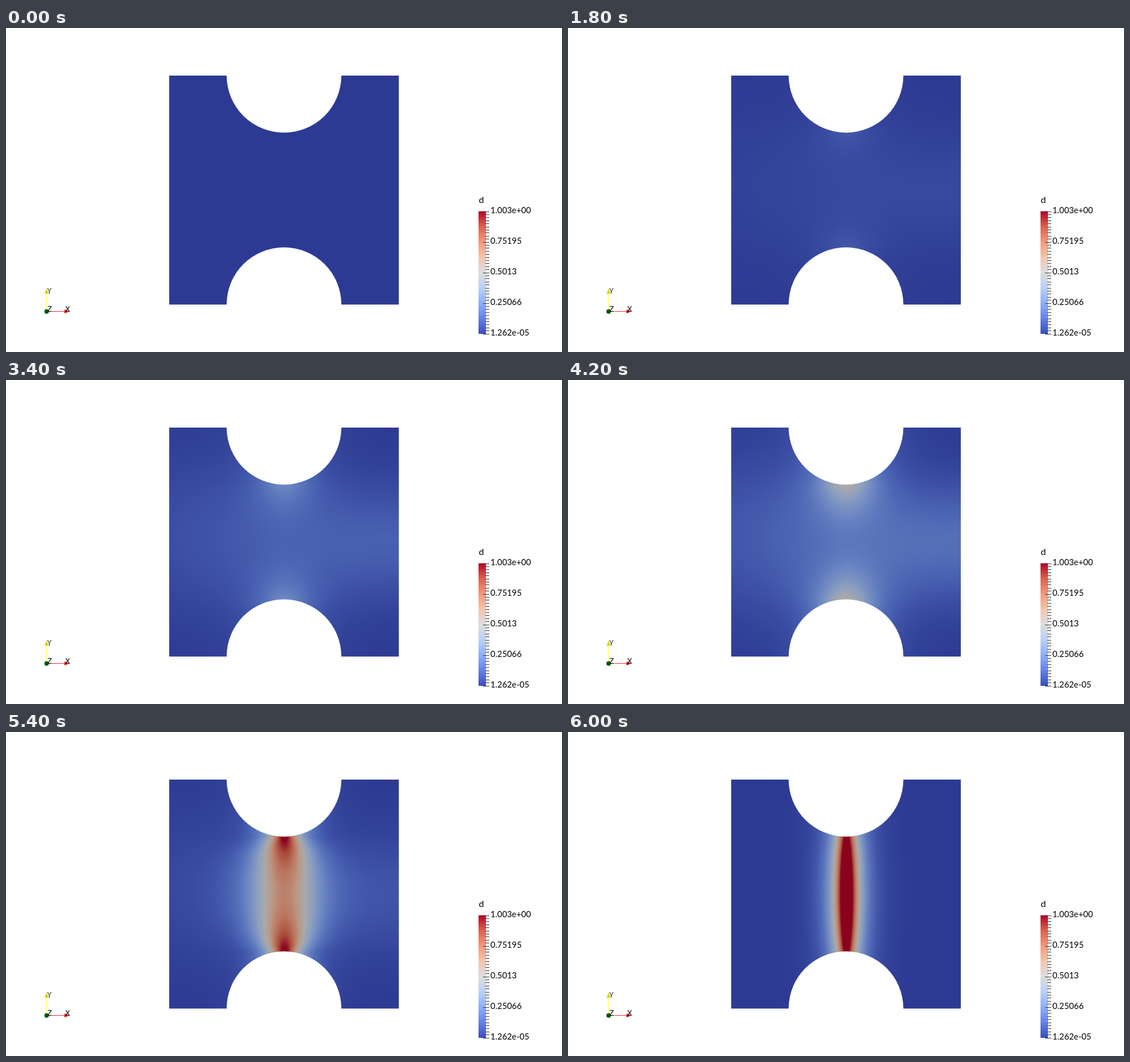
Recreate the animation shown at these times as an HTML page with a canvas. Size 979 by 572 pixels, loop 6.2 s.

```html
<!DOCTYPE html>
<html>
<head>
<meta charset="utf-8">
<style>
html, body { margin: 0; width: 100%; height: 100%; overflow: hidden; background: #fff; }
canvas { display: block; }
</style>
</head>
<body>
<canvas id="stage" width="979" height="572"></canvas>
<script>
const ctx = document.getElementById('stage').getContext('2d');
const LEFT = 287, TOP = 84, SIZE = 405, CX = 490, CY = 286, R = 101;
const SHADE = 0.765;

// Diverging cool-to-warm map, evenly spaced stops
const STOPS = [
  [59, 76, 192], [97, 130, 234], [140, 175, 254], [184, 208, 249], [221, 221, 221],
  [244, 196, 173], [244, 152, 122], [222, 96, 77], [180, 4, 38]
];
const mix = (a, b, u) => a + (b - a) * u;
function warmth(d) {
  const p = Math.max(0, Math.min(1, d)) * 8, i = Math.min(7, Math.floor(p));
  return STOPS[i].map((c, n) => mix(c, STOPS[i + 1][n], p - i));
}
const LUT = Array.from({ length: 1025 }, (_, i) => warmth(i / 1024).map(c => c * SHADE));

// step, background, then peak, core and decay of the band at the notch and at mid-height
const KEYS = [
  [0, 0, 0, 30, 30, 0, 60, 30],
  [7, .042, .07, 30, 30, 0, 60, 30],
  [15, .115, .22, 30, 30, .01, 60, 30],
  [19, .165, .46, 30, 30, .035, 60, 30],
  [23, .15, .82, 15, 28, .27, 60, 28],
  [26, .035, 1.15, 4, 19, .84, 60, 22],
  [28, 0, 1.1, 4, 18, 1.5, 4, 18]
];
function stateAt(step) {
  let i = 0;
  while (i < KEYS.length - 2 && step >= KEYS[i + 1][0]) i++;
  const a = KEYS[i], b = KEYS[i + 1];
  const u = Math.pow((step - a[0]) / (b[0] - a[0]), i ? 1.15 : 1.6);
  return a.map((v, n) => mix(v, b[n], u));
}

const field = document.createElement('canvas');
field.width = field.height = SIZE;
const fctx = field.getContext('2d');
const image = fctx.createImageData(SIZE, SIZE);

function paintField(step) {
  const [, back, peakN, coreN, decayN, peakM, coreM, decayM] = stateAt(step);
  const px = image.data;
  let o = 0;
  for (let j = 0; j < SIZE; j++) {
    const dy = j + TOP - CY, q = dy / R, g = Math.max(0, 1 - q * q);
    const peak = mix(peakN, peakM, g), core = mix(coreN, coreM, g), decay = mix(decayN, decayM, g);
    for (let i = 0; i < SIZE; i++) {
      const dx = i + LEFT - CX, side = Math.max(0, -dx / 203);
      const h = (dy + 12 * side) / (102 + 38 * side);
      const d = back * (1 - .48 * side) * Math.exp(-h * h)
        + peak * Math.exp((core - Math.hypot(dx, core)) / decay);
      const c = LUT[Math.round(Math.min(1, d) * 1024)];
      px[o++] = c[0];
      px[o++] = c[1];
      px[o++] = c[2];
      px[o++] = 255;
    }
  }
  fctx.putImageData(image, 0, 0);
}

function drawPlate() {
  const l = 287.3, r = 691.7, t = 83.8, b = 488.2, c = 489.5;
  ctx.save();
  ctx.beginPath();
  ctx.moveTo(l, t);
  ctx.arc(c, t, R, Math.PI, 0, true);
  ctx.lineTo(r, t);
  ctx.lineTo(r, b);
  ctx.arc(c, b, R, 0, Math.PI, true);
  ctx.lineTo(l, b);
  ctx.closePath();
  ctx.clip();
  ctx.drawImage(field, LEFT, TOP);
  ctx.restore();
}

function text(s, x, y, size, color = '#000') {
  ctx.font = size + 'px Lato, sans-serif';
  ctx.fillStyle = color;
  ctx.fillText(s, x, y);
}
function shape(color, ...pts) {
  ctx.fillStyle = color;
  ctx.beginPath();
  pts.forEach(p => ctx.lineTo(...p));
  ctx.fill();
}

function drawLegend() {
  const top = 323.5, height = 216.5;
  const ramp = ctx.createLinearGradient(0, top + height, 0, top);
  STOPS.forEach((c, i) => ramp.addColorStop(i / 8, `rgb(${c})`));
  ctx.fillStyle = ramp;
  ctx.fillRect(832, top, 13, height);
  ctx.fillStyle = '#333';
  for (let i = 0; i <= 40; i++) {
    const x = i % 10 ? 844 : 840;
    ctx.fillRect(x, Math.round(top + i * 5.4), 851 - x, 1);
  }
  text('d', 832.5, 309, 16);
  ['1.003e+00', '0.75195', '0.5013', '0.25066', '1.262e-05']
    .forEach((s, i) => text(s, 853, 327 + i * 54.1, 14.8));
}

function drawAxes() {
  ctx.fillStyle = '#ff2a2a';
  ctx.fillRect(74, 500, 30, 1);
  ctx.fillStyle = '#ffff3c';
  ctx.fillRect(71, 468, 1, 30);
  shape('#d81414', [103, 497], [112, 500.5], [103, 504]);
  shape('#d2d200', [68, 469], [71.5, 460], [75, 469]);
  ctx.fillStyle = '#045a0c';
  ctx.beginPath();
  ctx.arc(71.5, 500.5, 3.9, 0, Math.PI * 2);
  ctx.fill();
  text('Y', 72.5, 469, 12.5, '#333');
  text('Z', 73, 501, 13);
  text('X', 104.5, 501, 12.5);
}

let shown = -1;
function frame(now) {
  const step = Math.max(0, Math.floor((now % 6200) / 200) - 2);
  if (step !== shown) {
    shown = step;
    ctx.fillStyle = '#fff';
    ctx.fillRect(0, 0, 979, 572);
    paintField(step);
    drawPlate();
    drawLegend();
    drawAxes();
  }
  requestAnimationFrame(frame);
}
frame(performance.now());
</script>
</body>
</html>
```
